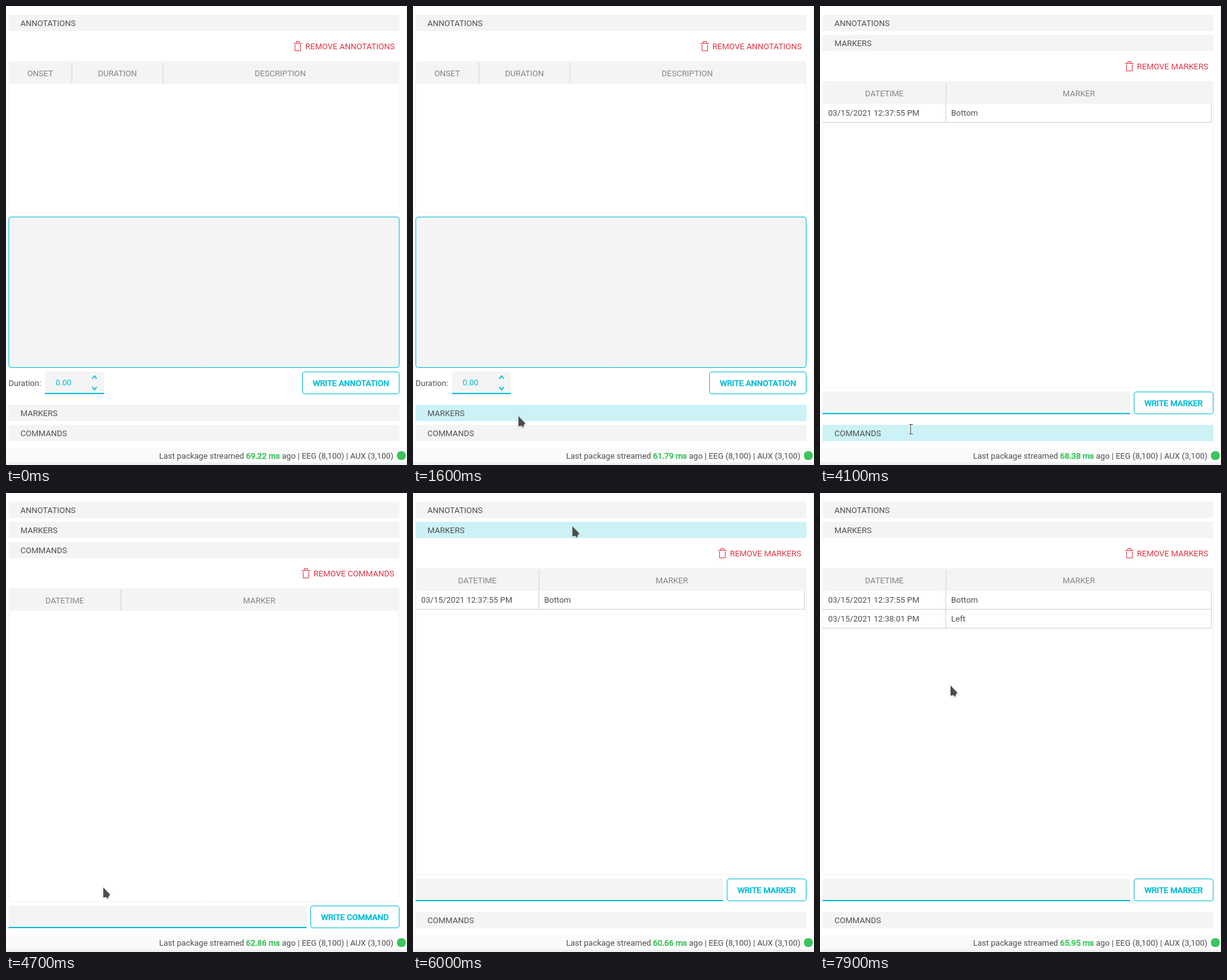
Write an HTML page with a canvas that moves like this. It is 639 px wide and 732 px high and loops after 8000 ms.

```html
<!DOCTYPE html>
<html lang="en">
<head>
<meta charset="utf-8">
<title>Annotations panel</title>
<style>
html, body { margin: 0; width: 639px; height: 732px; overflow: hidden; background: #fff; }
canvas { display: block; }
</style>
</head>
<body>
<canvas id="stage" width="639" height="732"></canvas>
<script>
const ctx = document.getElementById('stage').getContext('2d');
const LOOP = 8000, STEP = 100;
const LEFT = 4, RIGHT = 627, BAR = 26, PITCH = 32;
const CYAN = '#00bcd4', PALE = '#f4f4f4', TEXT = '#505050', RED = '#dc3545', GREEN = '#3cc45e';

// Columns: heading and right edge
const sections = [
  { name: 'ANNOTATION', columns: [['ONSET', 105], ['DURATION', 250], ['DESCRIPTION', 624]] },
  { name: 'MARKER', columns: [['DATETIME', 201], ['MARKER', 624]] },
  { name: 'COMMAND', columns: [['DATETIME', 183], ['MARKER', 624]] }
];

// The pointer appears at the entry point, then glides: start step, end step, x, y
const entry = [225, 143];
const moves = [
  [5, 10, 162, 355], [11, 15, 168, 654], [25, 30, 168, 291], [31, 34, 145, 675],
  [46, 52, 282, 49], [55, 57, 254, 53], [60, 68, 208, 307]
];

function pointerAt(step) {
  if (step < moves[0][0]) return null;
  let [x, y] = entry;
  for (const [from, to, nx, ny] of moves) {
    const u = Math.min(1, Math.max(0, (step - from) / (to - from)));
    const eased = u * u * (3 - 2 * u);
    x += (nx - x) * eased;
    y += (ny - y) * eased;
  }
  return [Math.round(x), Math.round(y)];
}

function sectionAt(step) {
  if (step < 23) return 0;
  return step >= 42 && step < 57 ? 2 : 1;
}

// A new package arrives on about two steps in three
function latency(step) {
  const count = Math.floor(step * 0.68);
  const noise = Math.abs(Math.sin((count + 1) * 12.9898) * 43758.5453) % 1;
  return (60 + noise * 10).toFixed(2);
}

function barTop(bar, open) {
  return bar <= open ? 14 + PITCH * bar : 604 + PITCH * bar;
}

function rect(x, y, w, h, color) {
  ctx.fillStyle = color;
  ctx.fillRect(x, y, w, h);
}

function rounded(x, y, w, h, radius, fill, stroke) {
  ctx.beginPath();
  ctx.roundRect(x, y, w, h, radius);
  if (fill) { ctx.fillStyle = fill; ctx.fill(); }
  if (stroke) { ctx.strokeStyle = stroke; ctx.lineWidth = 1; ctx.stroke(); }
}

function line(points, color, width) {
  ctx.beginPath();
  points.forEach(point => ctx.lineTo(...point));
  ctx.strokeStyle = color;
  ctx.lineWidth = width;
  ctx.stroke();
}

function measure(str) {
  ctx.font = '13px Roboto, sans-serif';
  return Math.round(ctx.measureText(str).width);
}

function text(str, x, y, color = TEXT, align = 'left', bold = false) {
  ctx.font = '13px Roboto, sans-serif';
  ctx.textAlign = align;
  ctx.fillStyle = color;
  ctx.fillText(str, x, y);
  if (bold) {
    ctx.strokeStyle = color;
    ctx.lineWidth = 0.7;
    ctx.strokeText(str, x, y);
  }
  return ctx.measureText(str).width;
}

function trash(x, y) {
  rect(x, y + 3, 14, 1, RED);
  line([[x + 4.5, y + 3], [x + 4.5, y + .5], [x + 9.5, y + .5], [x + 9.5, y + 3]], RED, 1);
  line([[x + 2.5, y + 5], [x + 2.5, y + 15.5], [x + 11.5, y + 15.5], [x + 11.5, y + 5]], RED, 1);
}

function input(x, y, w) {
  rounded(x, y, w, 36, [4, 4, 0, 0], PALE);
  rect(x, y + 34, w, 2, CYAN);
}

function chevron(x, y, dy) {
  line([[x - 3.5, y], [x, y + dy], [x + 3.5, y]], CYAN, 1.8);
}

function tableRow(index, date, label) {
  const y = 156 + 30 * index;
  rect(LEFT, y + 29, 620, 1, '#d0d0d0');
  for (const x of [200, 623]) rect(x, y, 1, 30, '#d0d0d0');
  text(date, 13, y + 19);
  text(label, 209, y + 19);
}

function drawTable(columns, top, bottom) {
  rounded(LEFT + .5, top + .5, 622, bottom - top - 1, 4, null, '#f1f1f1');
  rounded(LEFT, top, 623, 36, 4, PALE);
  let edge = LEFT;
  columns.forEach(([label, end], i) => {
    if (i) rect(edge - 1, top + 2, 2, 33, '#e3e3e3');
    text(label, (edge + end) / 2, top + 24, '#858585', 'center');
    edge = end;
  });
}

function drawSection(index, step) {
  const { name, columns } = sections[index];
  const top = 88 + PITCH * index;
  const formTop = index < 2 ? 583 + PITCH * index : 658;

  const remove = `REMOVE ${name}S`;
  const removeLeft = 619 - measure(remove);
  trash(removeLeft - 19, top - 32);
  text(remove, removeLeft, top - 19, RED);

  drawTable(columns, top, index ? formTop - 6 : 330);
  if (index === 1) {
    tableRow(0, '03/15/2021 12:37:55 PM', 'Bottom');
    if (step >= 73) tableRow(1, '03/15/2021 12:38:01 PM', 'Left');
  }

  const write = `WRITE ${name}`;
  const buttonLeft = RIGHT - measure(write) - 34;
  if (index) {
    input(LEFT, formTop, buttonLeft - 10);
  } else {
    rounded(LEFT + .5, 336.5, 622, 240, 3.5, PALE, CYAN);
    text('Duration:', LEFT, 606);
    input(62, formTop, 94);
    text('0.00', 79, 605, CYAN);
    chevron(141, 594.5, -4.5);
    chevron(141, 607.5, 4.5);
  }
  rounded(buttonLeft + .5, formTop + .5, RIGHT - buttonLeft - 1, 35, 3.5, '#fff', CYAN);
  text(write, buttonLeft + 17, formTop + 23, CYAN, 'left', true);
}

function drawStatus(step) {
  rect(0, 705, 639, 23, '#fafafa');
  rect(0, 728, 639, 4, '#eff0f1');
  rect(638, 0, 1, 732, '#ececec');
  let x = 244;
  x += text('Last package streamed ', x, 722);
  x += text(`${latency(step)} ms`, x, 722, GREEN, 'left', true);
  text(' ago | EEG (8,100) | AUX (3,100)', x, 722);
  rounded(623, 710, 14, 14, 6, GREEN);
}

function drawBeam() {
  for (const [color, width] of [['rgba(255,255,255,.8)', 3], ['#404040', 1]]) {
    line([[-.5, -7.5], [-.5, 7.5]], color, width);
    for (const y of [-7.5, 7.5]) line([[-3, y], [3, y]], color, width);
  }
}

function drawArrow() {
  ctx.beginPath();
  [[0, 0], [0, 16], [5, 15.5], [7.5, 18.5], [8.5, 14.5], [11, 11.5]].forEach(p => ctx.lineTo(...p));
  ctx.closePath();
  ctx.shadowColor = 'rgba(0,0,0,.3)';
  ctx.shadowBlur = 3;
  ctx.shadowOffsetY = 1;
  ctx.strokeStyle = '#fff';
  ctx.stroke();
  ctx.shadowColor = 'transparent';
  ctx.fillStyle = '#4d4d4d';
  ctx.fill();
}

function drawPointer([x, y], index) {
  const overInput = index ? y > 658 : y > 336 && y < 577;
  ctx.save();
  ctx.translate(x, y);
  ctx.lineWidth = 1;
  overInput ? drawBeam() : drawArrow();
  ctx.restore();
}

function draw(step) {
  rect(0, 0, 639, 732, '#fff');
  const open = sectionAt(step);
  const pointer = pointerAt(step), previous = pointerAt(step - 1);
  sections.forEach(({ name }, i) => {
    // Highlighting lags one step behind the pointer
    const y = barTop(i, open);
    const hover = previous && previous[1] >= y && previous[1] < y + BAR;
    rounded(LEFT, y, 623, BAR, 1, hover ? '#ccf2f6' : PALE);
    text(`${name}S`, 23, y + 18);
  });
  drawSection(open, step);
  drawStatus(step);
  if (pointer) drawPointer(pointer, open);
}

const start = performance.now();
function tick() {
  draw(Math.floor(((performance.now() - start) % LOOP) / STEP));
  requestAnimationFrame(tick);
}
tick();
</script>
</body>
</html>
```
